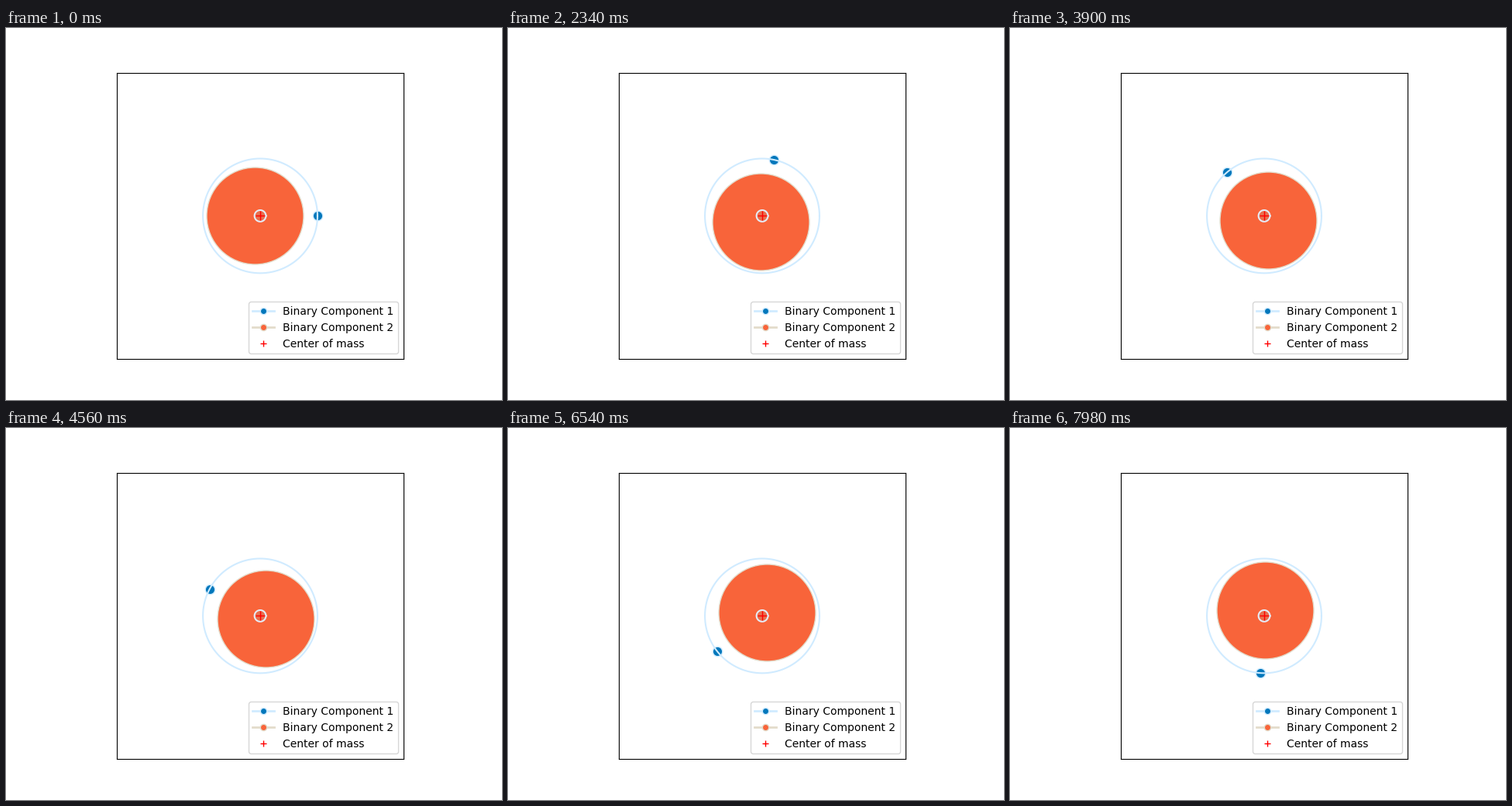
Write a matplotlib script that moves like this. It is 640 px wide and 480 px high and loops after 8000 ms.

```python
import numpy as np
import matplotlib.pyplot as plt
from matplotlib.animation import FuncAnimation
from matplotlib.lines import Line2D

TICK_MS, LOOP_MS, STEP_MS = 20, 8000, 30
R1, R2 = 1.0, 0.1
BLUE, PALE_BLUE = "#0077bb", "#d0ebff"
ORANGE, BEIGE = "#f8643a", "#e3dccb"

fig, ax = plt.subplots(figsize=(6.4, 4.8), dpi=100)
ax.set_aspect("equal")
ax.set(xlim=(-2.5, 2.5), ylim=(-2.5, 2.5), xticks=[], yticks=[])


def body(face, edge, size, z):
    return ax.plot([], [], "o", ms=size, mfc=face, mec=edge, mew=1, zorder=z)[0]


def orbit(radius, color, z):
    t = np.linspace(0, 2 * np.pi, 361)
    ax.plot(radius * np.cos(t), radius * np.sin(t), color=color, lw=1.5, zorder=z)


big = body(ORANGE, BEIGE, 90, 2)
small = body(BLUE, PALE_BLUE, 9, 3)
orbit(R1, PALE_BLUE, 4)
ax.plot(0, 0, "o", ms=9, mfc="#e8704f", mec="none", zorder=4)
orbit(R2, "#e4ecf8", 5)
ax.plot(0, 0, "r+", ms=9, zorder=6)


def key(line, face, label):
    return Line2D([], [], color=line, lw=2, marker="o", ms=6,
                  mfc=face, mec=line, label=label)


ax.legend(loc="lower right", handles=[
    key(PALE_BLUE, BLUE, "Binary Component 1"),
    key(BEIGE, ORANGE, "Binary Component 2"),
    Line2D([], [], color="red", ls="none", marker="+", ms=6, label="Center of mass"),
]).set_zorder(7)


def update(tick):
    # The pair turns one degree every 30 ms.
    step = (tick * TICK_MS + TICK_MS // 2) // STEP_MS
    angle = np.radians(step)
    x, y = np.cos(angle), np.sin(angle)
    small.set_data([R1 * x], [R1 * y])
    big.set_data([-R2 * x], [-R2 * y])
    return small, big


anim = FuncAnimation(fig, update, frames=LOOP_MS // TICK_MS,
                     interval=TICK_MS, repeat=True, repeat_delay=0)
plt.show()
```
